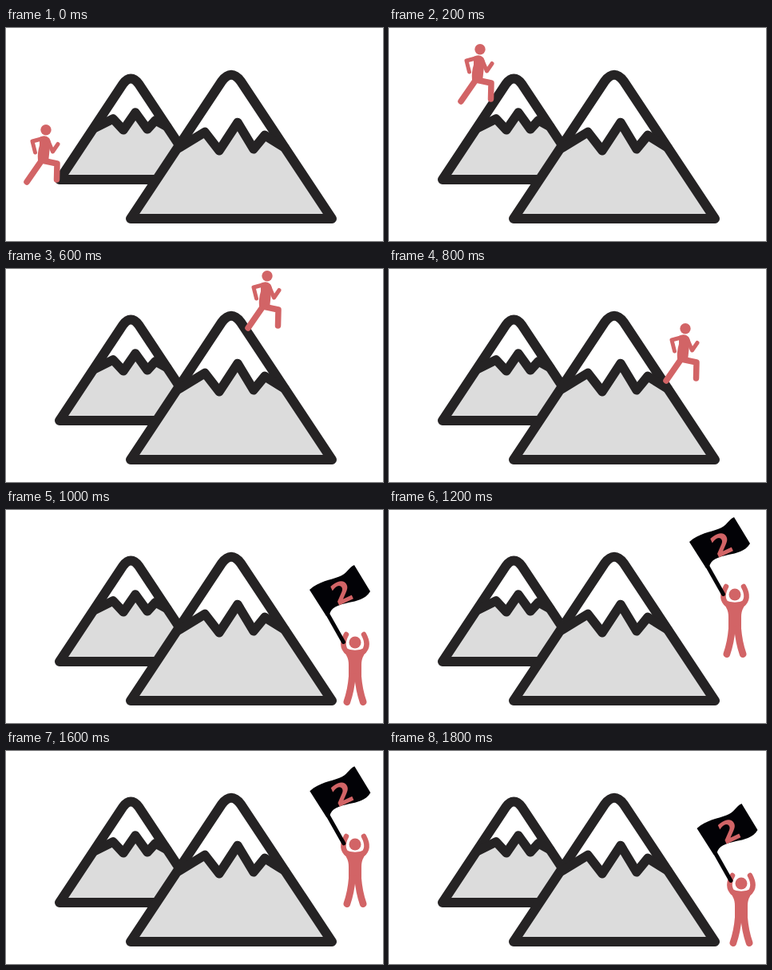
These frames come from a looping animation (472x267 px, 2 s). An HTML page:

```html
<!DOCTYPE html>
<html lang="en">
<head>
<meta charset="utf-8">
<title>Over the mountains</title>
<style>
  html, body { margin: 0; width: 100%; height: 100%; overflow: hidden; background: #fff; }
  svg { display: block; width: 472px; height: 267px; }
  .line { fill: none; stroke: #252324; stroke-width: 12; stroke-linecap: round; stroke-linejoin: round; }
  .ridge { stroke-width: 11.5; }
  .snow { fill: #fff; }
  .rock { fill: #dcdcdc; }
  .limb { fill: none; stroke: #d26466; stroke-linecap: round; stroke-linejoin: round; }
  .skin { fill: #d26466; }
  .flag { fill: #020206; }
  .pole { stroke: #020206; stroke-width: 5; stroke-linecap: round; }
  text { font: bold 37px "DejaVu Sans", sans-serif; text-anchor: middle; fill: #d26466; }
</style>
</head>
<body>
<svg viewBox="0 0 472 267">
  <g id="land"></g>

  <g id="runner">
    <circle class="skin" cx="50" cy="127.7" r="6.7"/>
    <path class="skin" d="M42 137Q49 133 54 138Q57 142 55 149L53 168L40 166Q39 157 42 147Z"/>
    <path class="limb" stroke-width="5" d="M46 138.5L33 142L36.5 156M53 142L58.5 155L65 145.5"/>
    <path class="limb" stroke-width="7.5" d="M44 167L26 193M45 166L64 170L63.5 190"/>
  </g>

  <g id="winner">
    <circle class="skin" cx="433" cy="106" r="7.5"/>
    <path class="skin" d="M421 113Q433 118.5 445 113L444 122Q441 127 441 134L441 151L425 151L425 134Q425 127 422 122Z"/>
    <path class="limb" stroke-width="6.5" d="M422 96Q414 111 424 119M444 96Q452 111 442 119"/>
    <path class="limb" stroke-width="8.7" d="M429.4 148Q428 166 422.8 180.7M436.6 148Q438 166 443.2 180.7"/>
  </g>

  <g id="banner">
    <path class="pole" d="M399 71L418.5 105.5"/>
    <path class="flag" d="M376 40C388 29 402 28 413 23.500C423 20 425 12 432 9L452 42C446 52 435 54 425 56C412 59 403 62 401 71L397 73Z"/>
    <text transform="translate(416.5 43) rotate(-25)" y="13.5">2</text>
  </g>
</svg>
<script>
  const STEP = 200, RUN = 5, HOPS = 5, SLOPE = 1.51;
  const $ = id => document.getElementById(id);

  // A rounded triangle with rock below the snow line.
  function mountain(cx, base, half, cap, ridge) {
    const left = cx - half, right = cx + half;
    const y = base - (half - cap) * SLOPE;
    const peak = `M${left} ${base}L${cx - cap} ${y}Q${cx} ${y - cap * 1.35} ${cx + cap} ${y}L${right} ${base}Z`;
    return `<path class="snow" d="${peak}"/>
      <path class="rock" d="M${left} ${base}L${ridge}L${right} ${base}Z"/>
      <path class="line" d="${peak}"/>
      <path class="line ridge" d="M${ridge}"/>`;
  }

  $("land").innerHTML =
    mountain(156.3, 190, 89.3, 10, "112 125 134 113.8 147 127.8 162 106 177 126.8 187 115.8 202 124") +
    mountain(282, 239, 126, 12, "217 150 249 130.5 267 153.7 290 118.5 310 151.7 324 134.5 349 150");

  // Strides over both peaks, relative to the starting pose.
  const strides = [[0, 0], [64, -101], [182, -102], [277, -119], [321, -53]];

  // Odd hops are in the air, each lower than the last; landings sway sideways.
  function hop(k) {
    const tired = (k - 1) / 2;
    return k % 2 ? [4 * tired, 11 * tired] : [8 - 4 * Math.cos(k * Math.PI * 3 / 8), 60];
  }

  function place(el, pos) {
    el.style.display = pos ? "" : "none";
    if (pos) el.setAttribute("transform", `translate(${pos})`);
  }

  function draw(time) {
    const step = Math.floor(time / STEP) % (RUN + HOPS);
    const k = step - RUN;
    const pos = k >= 0 && hop(k);
    const lift = 3 * (k / (HOPS - 1)) ** 5; // the flag ends raised a little
    place($("runner"), strides[step]);
    place($("winner"), pos);
    place($("banner"), pos && [pos[0] + lift / 2, pos[1] - lift]);
  }

  const start = performance.now();
  function tick() {
    draw(performance.now() - start);
    requestAnimationFrame(tick);
  }
  tick();
</script>
</body>
</html>
```
